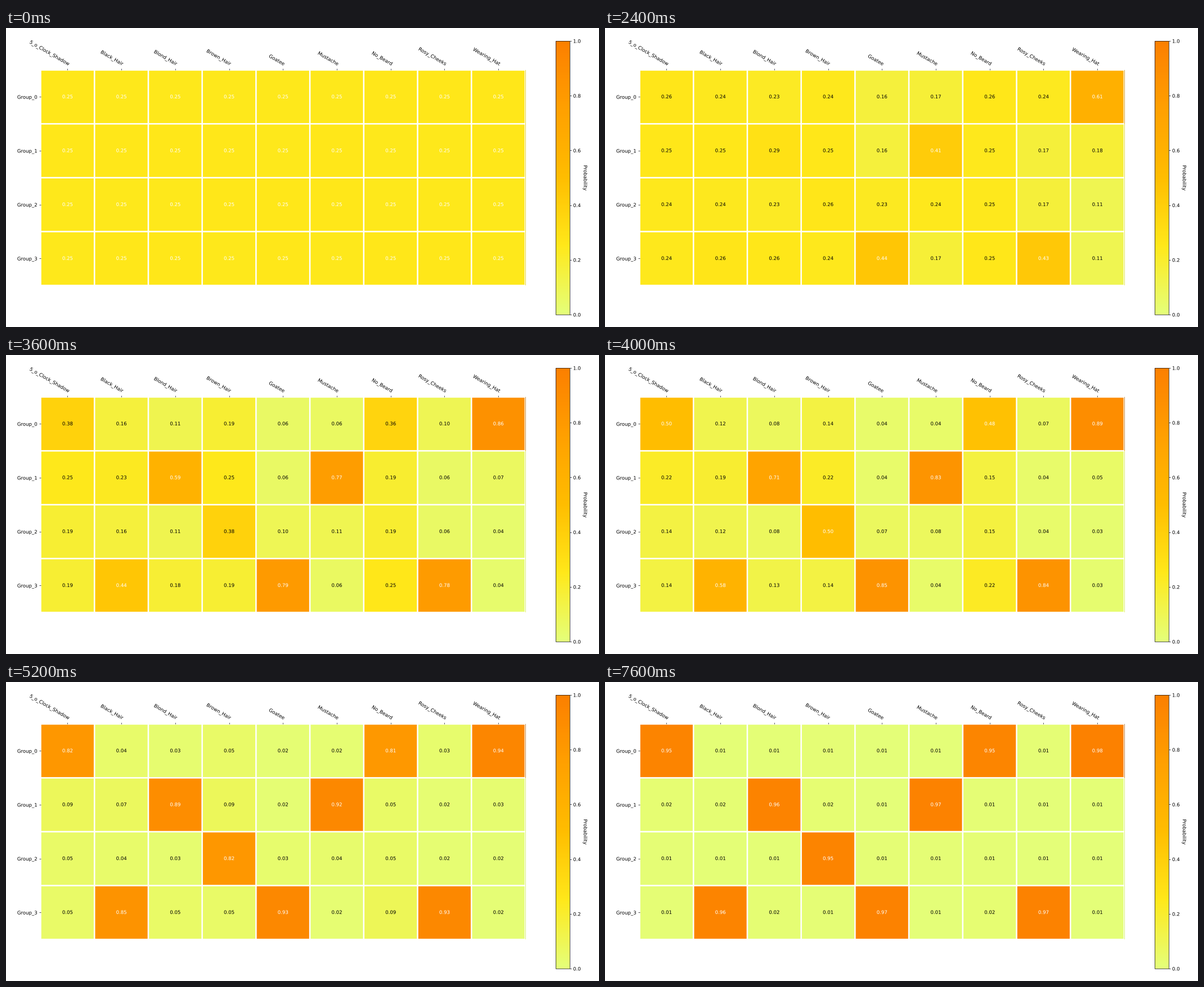
These frames come from a looping animation (1054 by 531 pixels, 8000 ms). A matplotlib script:

```python
import numpy as np
import matplotlib.pyplot as plt
from matplotlib.animation import FuncAnimation
from matplotlib.patheffects import Normal
from matplotlib.text import Text

WIDTH, HEIGHT, DPI = 1054, 531, 64
SCALE = 0.964
STEPS, INTERVAL = 20, 400

GROUPS = [f"Group_{i}" for i in range(4)]
# Each attribute: the group that wins it, the runner-up, and the step of the takeover.
ATTRIBUTES = {
    "5_o_Clock_Shadow": (0, 1, 10.2),
    "Black_Hair": (3, 1, 9.6),
    "Blond_Hair": (1, 3, 8.5),
    "Brown_Hair": (2, 1, 10.2),
    "Goatee": (3, 2, 6.6),
    "Mustache": (1, 2, 6.9),
    "No_Beard": (0, 3, 10.35),
    "Rosy_Cheeks": (3, 0, 6.7),
    "Wearing_Hat": (0, 1, 5.4),
}


def column(step, winner, runner_up, takeover):
    """Odds of the winner rise from 1:3; the others share the rest."""
    u = step - takeover
    growth = np.log1p(np.exp(u))
    odds = 1 / 3 + growth * (1 + 0.15 * growth)
    shares = np.ones(4)
    shares[runner_up] += 0.75 / (1 + np.exp(-u - 1))
    shares[winner] = 0
    shares /= shares.sum()
    shares[winner] = odds
    return shares / (1 + odds)


def probabilities(step):
    return np.column_stack([column(step, *rule) for rule in ATTRIBUTES.values()])


def add_axes(left, top, right, bottom):
    return fig.add_axes([left / WIDTH, 1 - bottom / HEIGHT,
                         (right - left) / WIDTH, (bottom - top) / HEIGHT])


plt.rcParams.update({
    "font.family": "DejaVu Sans", "font.size": 10 * SCALE, "text.hinting": "none",
    "axes.linewidth": 0.8 * SCALE, "axes.labelpad": 4 * SCALE,
    **{f"{axis}tick.major.{name}": size * SCALE for axis in "xy"
       for name, size in (("size", 3.5), ("width", 0.8), ("pad", 3.5))},
})
fig = plt.figure(figsize=(WIDTH / DPI, HEIGHT / DPI), dpi=DPI, facecolor="white")

rows, cols = len(GROUPS), len(ATTRIBUTES)
ax = add_axes(61.5, 74.5, 923, 457.2)
image = ax.imshow(probabilities(0), cmap="Wistia", vmin=0, vmax=1, aspect="auto")
ax.set_xticks(range(cols), list(ATTRIBUTES))
ax.set_yticks(range(rows), GROUPS)
ax.tick_params(top=True, bottom=False, labeltop=True, labelbottom=False)
plt.setp(ax.get_xticklabels(), rotation=-30, ha="right", rotation_mode="anchor")
ax.spines[:].set_visible(False)
ax.set_xticks(np.arange(cols + 1) - 0.5, minor=True)
ax.set_yticks(np.arange(rows + 1) - 0.5, minor=True)
ax.grid(which="minor", color="white", linestyle="-", linewidth=3 * SCALE, snap=False)
ax.tick_params(which="minor", top=False, bottom=False, left=False)

bar = fig.colorbar(image, cax=add_axes(977, 23, 1002, 509), ticks=np.linspace(0, 1, 6))
bar.ax.set_ylabel("Probability", rotation=-90, va="bottom")

labels = [[ax.text(col, row, "", ha="center", va="center") for col in range(cols)]
          for row in range(rows)]
# Thin rim along the right edge of the heatmap.
rims = [ax.plot([cols - 0.497] * 2, [row - 0.5, row + 0.48], color="gray", lw=0.8,
                clip_on=False, scalex=False, scaley=False, zorder=5)[0] for row in range(rows)]

# Draw text as outlines, so that letters keep their fractional spacing.
for text in fig.findobj(Text):
    text.set_path_effects([Normal()])


def update(step):
    values = probabilities(step)
    image.set_data(values)
    threshold = values.max() / 2
    for (row, col), value in np.ndenumerate(values):
        labels[row][col].set_text(f"{value:.2f}")
        labels[row][col].set_color("white" if value > threshold else "black")
    for rim, value in zip(rims, values[:, -1]):
        rim.set_alpha(0.15 + 0.5 * value)
    return [image]


anim = FuncAnimation(fig, update, frames=STEPS, interval=INTERVAL, repeat=True, repeat_delay=0)
plt.show()
```
